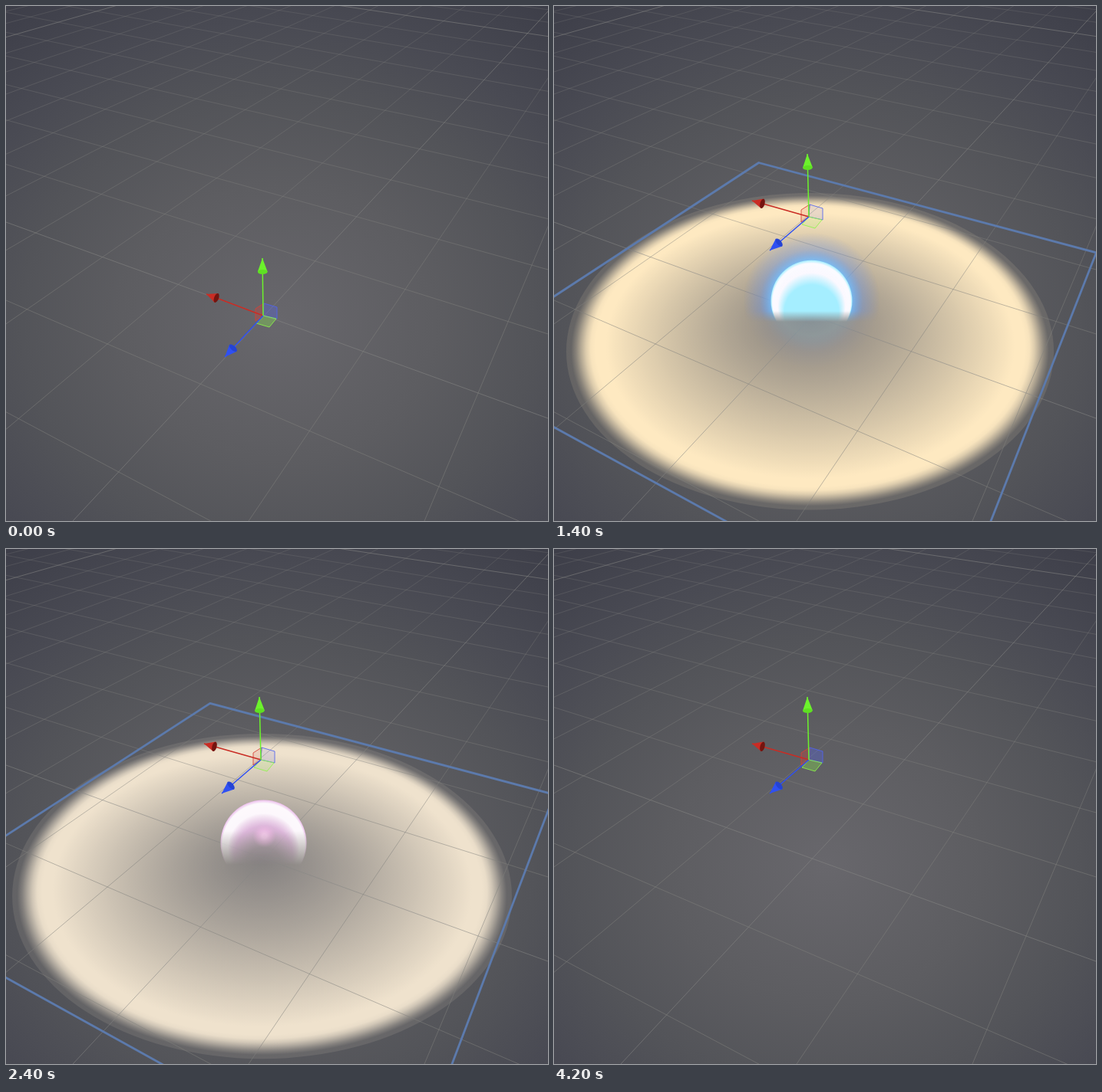
Animation, 706 px wide and 672 px high, one loop 4.3 s. Source, as an HTML page with a canvas:

```html
<!DOCTYPE html>
<html>
<head>
<meta charset="utf-8">
<style>
html, body { margin: 0; width: 100%; height: 100%; overflow: hidden; background: #46474d; }
canvas { display: block; }
</style>
</head>
<body>
<canvas id="stage" width="706" height="672"></canvas>
<script>
const W = 706, H = 672, LOOP = 4300, STEP = 100;
const ctx = document.getElementById('stage').getContext('2d');
const layer = document.createElement('canvas');
layer.width = W;
layer.height = H;
const orb = layer.getContext('2d');

const rgba = (c, a) => `rgba(${c.map(Math.round).join()},${a})`;
const mix = (a, b, k) => a + (b - a) * k;
const blend = (a, b, k) => a.map((x, i) => mix(x, b[i], k));
const ramp = (x, from, to) => Math.max(0, Math.min(1, (x - from) / (to - from)));
const easeInOut = (k, n) => k < .5 ? (2 * k) ** n / 2 : 1 - (2 - 2 * k) ** n / 2;

// The burst plays once quickly, then slowly with a pause.
function ageAt(t) {
  if (t >= 400 && t < 700) return easeInOut((t - 400) / 300, 7);
  if (t >= 900 && t < 3500) return ((t > 2400 && t < 3100 ? 2400 : t) - 900) / 2600;
  return null;
}

function burst(age) {
  const spark = ramp(age, 0, .08), warm = ramp(age, .08, .42), cool = ramp(age, .42, .85);
  const grow = ramp(age, .42, 1) ** 2;
  const glow = 1 - ramp(age, .2, .4);
  const r = 36 + 17 * ramp(age, 0, .17) + 41 * grow;
  const fire = blend(blend([197, 160, 131], [254, 226, 182], spark), [255, 246, 216], warm);
  return {
    r, glow,
    y: 406 - .4 * r,
    size: 2.21 + .71 * grow,
    alpha: 1 - ramp(age, .85, 1.02),
    rim: blend(fire, [212, 192, 187], cool),
    tint: blend([236, 190, 236], blend([115, 220, 255], [165, 238, 255], ramp(age, 0, .15)), glow)
  };
}

function path(c, pts, close) {
  c.beginPath();
  pts.forEach(p => c.lineTo(p[0], p[1]));
  if (close) c.closePath();
}

function addStops(g, stops) {
  stops.forEach(([k, c]) => g.addColorStop(k, c));
  return g;
}

// Ground plane: rows run to the right, columns run towards a vanishing point.
const VX = 920, VY = -223;
const rowLeft = j => (282 - 44.4 * j) / (1 + .15 * j);
const rowRight = j => (538 - 43.7 * j) / (1 + .155 * j);
const colFoot = i => 87 + 229 * i;

function ground(i, j) {
  const l = rowLeft(j), m = (rowRight(j) - l) / W, b = colFoot(i);
  const u = (H - l - m * b) / (H - VY + m * (VX - b));
  return [b + (VX - b) * u, H + (VY - H) * u];
}

function backdrop() {
  ctx.save();
  ctx.translate(355, 412);
  ctx.scale(1, .88);
  ctx.fillStyle = addStops(ctx.createRadialGradient(0, 0, 0, 0, 0, 620), [
    [0, '#68676c'], [.33, '#5d5d61'], [.54, '#535459'], [.72, '#494a53'], [1, '#3a3b46']
  ]);
  ctx.fillRect(-W, -H, 2 * W, 2 * H);
  ctx.restore();
}

function grid() {
  const minor = addStops(ctx.createLinearGradient(0, 0, 0, 420), [
    [0, 'rgba(128,128,126,.26)'], [1, 'rgba(128,128,124,.52)']
  ]);
  const line = (n, a, b) => {
    ctx.strokeStyle = n % 10 ? minor : 'rgba(134,134,132,.56)';
    path(ctx, [a, b]);
    ctx.stroke();
  };
  ctx.lineWidth = 1;
  for (let j = -2; j <= 12; j++) line(j, [0, rowLeft(j)], [W, rowRight(j)]);
  for (let i = -13; i <= 3; i++) line(i, [colFoot(i), H], [VX, VY]);
}

// A circle on the ground, shaded outwards from the origin at (335, 404).
function disc(s) {
  const u = s.size / 2.16, k = 191.7 * u, h = .221 * u;
  const top = 404 - k / (1 + h), bottom = 404 + k / (1 - h);
  const rx = 302.3 * u / Math.sqrt(1 - h * h), ry = (bottom - top) / 2, cy = (top + bottom) / 2;
  ctx.save();
  ctx.translate(333.5, cy);
  ctx.scale(rx, ry);
  const g = ctx.createRadialGradient(1.5 / rx, (404 - cy) / ry, 0, 0, 0, 1);
  for (let p = 0; p <= 1; p += .02) {
    const body = .22 + .78 * ramp(p, 0, .84) ** 1.15;
    const edge = 1 - easeInOut(ramp(p, .89, 1), 1.5);
    g.addColorStop(p, rgba(s.rim, body * edge * s.alpha));
  }
  ctx.fillStyle = g;
  ctx.beginPath();
  ctx.arc(0, 0, 1, 0, 7);
  ctx.fill();
  ctx.restore();
}

function frame(s) {
  const left = -.125 - s.size, right = -.105 + s.size, near = .1 - s.size, far = .1 + s.size;
  ctx.strokeStyle = `rgba(92,122,172,${Math.min(1, s.alpha * 1.5)})`;
  ctx.lineWidth = 2.8;
  ctx.lineJoin = 'round';
  path(ctx, [ground(left, near), ground(left, far), ground(right, far), ground(right, near)], true);
  ctx.stroke();
}

function ball(c, x, y, r, inner, stops) {
  c.fillStyle = addStops(c.createRadialGradient(x, y, inner, x, y, r), stops);
  c.beginPath();
  c.arc(x, y, r, 0, 7);
  c.fill();
}

function sphere(s) {
  const x = 335.5, { y, r, tint, glow } = s;
  const halo = (c, a) => ball(c, x, y, r + 36, r * .85, [
    [0, `rgba(125,205,255,${a * glow})`], [.2, `rgba(110,185,255,${a * glow * .8})`],
    [.5, `rgba(100,150,245,${a * glow * .3})`], [1, 'rgba(100,135,230,0)']
  ]);
  halo(ctx, .18 * s.alpha);
  orb.clearRect(0, 0, W, H);
  halo(orb, .95);
  // Highlight is a crescent, widest at the top.
  orb.fillStyle = addStops(orb.createRadialGradient(x, y + .5 * r, .4 * r, x, y, r), [
    [0, rgba(tint, .3 + .7 * glow)], [.45, rgba(tint, .8 + .2 * glow)],
    [.72, 'rgba(255,250,255,.97)'], [.93, 'rgba(255,252,255,.97)'], [1, rgba(tint, 1)]
  ]);
  orb.beginPath();
  orb.arc(x, y, r, 0, 7);
  orb.fill();
  const spot = .85 * (1 - glow);
  ball(orb, x + 1, y - 9, 15, 3, [
    [0, `rgba(250,205,240,${spot})`], [.5, `rgba(240,185,230,${spot * .7})`], [1, 'rgba(235,180,225,0)']
  ]);
  // The lower part sinks softly into the ground.
  orb.globalCompositeOperation = 'destination-in';
  orb.fillStyle = addStops(orb.createLinearGradient(0, mix(368, 398, glow), 0, 412), [
    [0, '#000'], [1, 'transparent']
  ]);
  orb.fillRect(0, 0, W, H);
  orb.globalCompositeOperation = 'source-over';
  ctx.globalAlpha = s.alpha;
  ctx.drawImage(layer, 0, 0);
  ctx.globalAlpha = 1;
}

function arrow(from, tip, length, color, base) {
  ctx.strokeStyle = color;
  ctx.lineWidth = 1.5;
  path(ctx, [from, tip]);
  ctx.stroke();
  ctx.save();
  ctx.translate(...tip);
  ctx.rotate(Math.atan2(tip[1] - from[1], tip[0] - from[0]));
  ctx.fillStyle = color;
  path(ctx, [[0, 0], [-length, -6.5], [-length, 6.5]], true);
  ctx.fill();
  ctx.fillStyle = base;
  ctx.beginPath();
  ctx.ellipse(-length, 0, 3, 6.3, 0, 0, 7);
  ctx.fill();
  ctx.restore();
}

function gizmo(x, y, up, red, blue, lit) {
  const quad = (pts, c) => {
    path(ctx, [[0, 0], ...pts].map(([a, b]) => [x + a, y + b]), true);
    ctx.fillStyle = rgba(c, lit ? .12 : .32);
    ctx.fill();
    ctx.strokeStyle = rgba(c, .85);
    ctx.lineWidth = 1;
    ctx.stroke();
  };
  quad([[-10, 7], [-10, -9], [1, -16]], [215, 65, 55]);
  quad([[1, -16], [18, -11], [18, 4]], [80, 100, 240]);
  quad([[17, 4], [8, 15], [-9, 10]], [140, 245, 75]);
  arrow([x, y], red, 14, '#c92c24', '#74140f');
  arrow([x, y], blue, 16, '#2f50f2', '#2443d4');
  arrow([x, y], up, 18, '#6cf22c', '#5ee022');
}

function cursor(x, y) {
  path(ctx, [[0, 0], [0, 16], [3.6, 12.6], [6, 18], [8.6, 17], [6.2, 11.6], [10.6, 11.2]]
    .map(([a, b]) => [x + a, y + b]), true);
  ctx.fillStyle = '#45464c';
  ctx.fill();
  ctx.strokeStyle = '#f4f4f4';
  ctx.lineWidth = 1.2;
  ctx.stroke();
}

function draw() {
  const t = Math.floor(performance.now() % LOOP / STEP) * STEP;
  const age = ageAt(t);
  const s = age === null ? null : burst(age);
  backdrop();
  if (s) disc(s);
  grid();
  if (s) {
    sphere(s);
    frame(s);
  }
  if (t < 400) gizmo(335, 404, [334, 329], [261, 376], [285, 458], false);
  else gizmo(332, 275, [330, 193], [258, 254], [281, 319], !!s);
  if (t >= 1000 && t < 1200) cursor(557 + (1100 - t) * .13, 92 - (1100 - t) * .07);
  requestAnimationFrame(draw);
}
draw();
</script>
</body>
</html>
```
